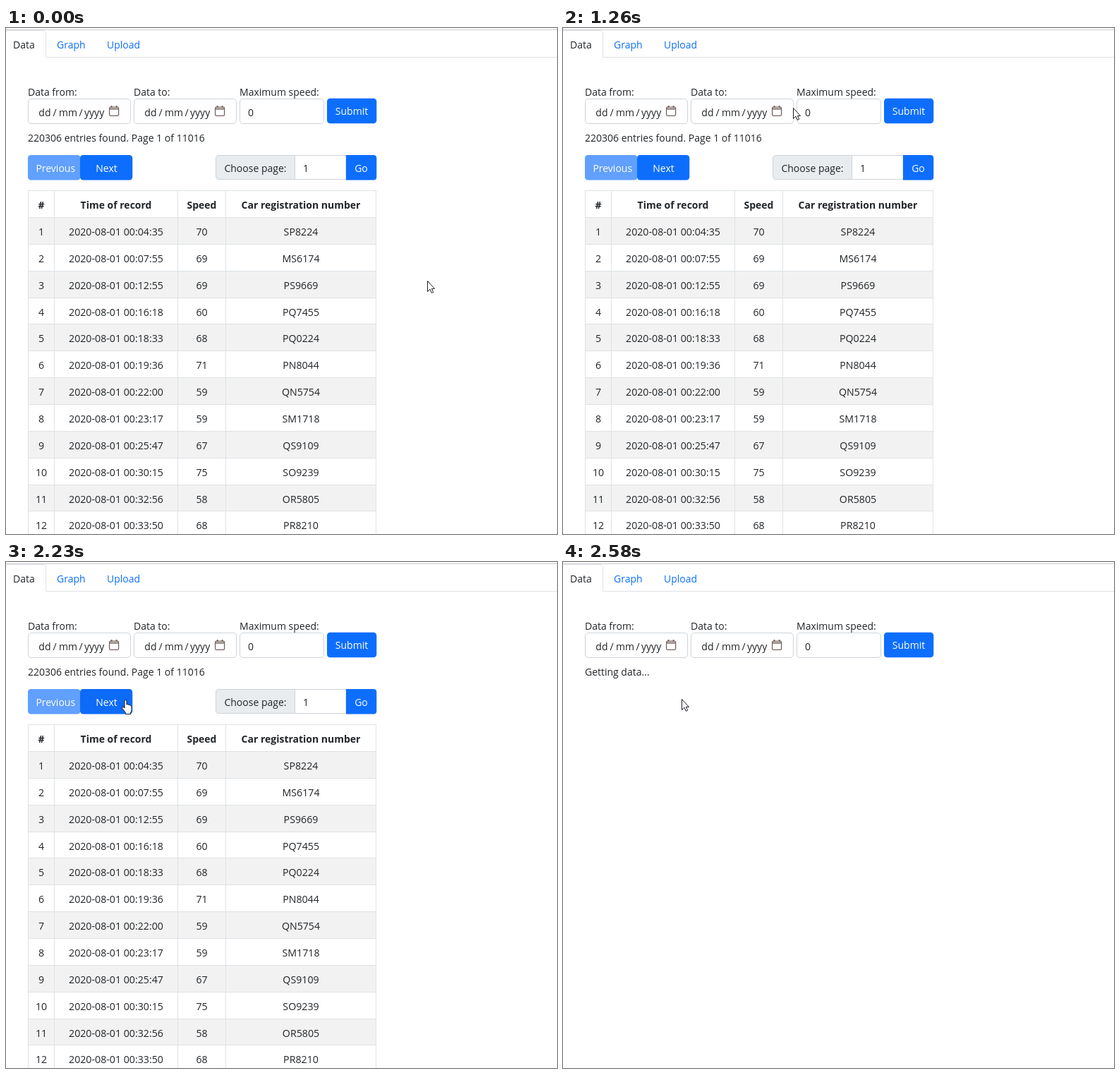
An HTML page for the animation above (8000 ms loop, 781 px wide and 717 px high).

```html
<!DOCTYPE html>
<html lang="en">
<head>
<meta charset="utf-8">
<title>Speed records</title>
<style>
  html, body { margin: 0; width: 100%; height: 100%; overflow: hidden; background: #fff; }
  svg { display: block; }
  text { font: 14px "Open Sans", "Noto Sans", sans-serif; fill: #212529; white-space: pre; }
  .mid { text-anchor: middle; }
  .cell { font-size: 14.2px; }
  .head { font-weight: 700; }
  .link { fill: #0d6efd; }
  .light { fill: #fff; }
  .field { fill: #fff; stroke: #ced4da; }
  .line { fill: none; stroke: #dee2e6; }
  .button { fill: #0d6efd; }
  .icon { fill: none; stroke: #75645f; stroke-width: 1.3; }
  .pointer { fill: #fff; stroke: #1c1c24; stroke-linejoin: round; }
</style>
</head>
<body>
<svg width="781" height="717" viewBox="0 0 781 717">
  <path d="M0 2.5H781" stroke="#cdcdd0"/>
  <path class="line" d="M0 3.5H52Q56.5 3.5 56.5 8V41.5H781"/>
  <text x="10" y="29">Data</text>
  <text class="link" x="72" y="29">Graph</text>
  <text class="link" x="143" y="29">Upload</text>

  <text x="31" y="96">Data from:</text>
  <text x="181" y="96">Data to:</text>
  <text x="331" y="96">Maximum speed:</text>
  <defs>
    <g id="date">
      <rect class="field" x="31.5" y="100.5" width="145" height="35" rx="4.5"/>
      <text y="125"><tspan x="46.3">dd</tspan><tspan x="66.5">/</tspan><tspan x="75">mm</tspan><tspan x="103.5">/</tspan><tspan x="111">yyyy</tspan></text>
      <rect class="icon" x="146.6" y="112.2" width="13" height="12.2" rx="1.6"/>
      <path class="icon" d="M146.6 114.6H159.6M149.6 110V113M156.6 110V113" style="stroke-width:1.8"/>
    </g>
  </defs>
  <use href="#date"/>
  <use href="#date" x="150"/>
  <rect class="field" x="331.5" y="100.5" width="119" height="35" rx="4.5"/>
  <text x="343" y="125">0</text>
  <rect class="button" x="455" y="99.7" width="70.3" height="35.6" rx="4.5"/>
  <text class="mid light" x="490" y="123">Submit</text>
  <text id="status" x="31" y="161"></text>

  <g id="results">
    <rect class="button" x="31" y="179.9" width="74.5" height="35.6" rx="4.5" opacity=".65"/>
    <text class="mid light" x="70.3" y="204">Previous</text>
    <rect class="button" id="next" x="105" y="179.9" width="74.3" height="35.6" rx="4.5"/>
    <text class="mid light" x="142.5" y="204">Next</text>
    <path class="field" d="M409.5 180.5H482V214.5H409.5Z"/>
    <path d="M409.5 180.5H302Q297.5 180.5 297.5 185V210Q297.5 214.5 302 214.5H409.5Z" fill="#e9ecef" stroke="#ced4da"/>
    <text class="mid" x="353.5" y="204">Choose page:</text>
    <text x="421" y="204">1</text>
    <path class="button" d="M482 179.9H520.8Q525.3 179.9 525.3 184.4V211Q525.3 215.5 520.8 215.5H482Z"/>
    <text class="mid light" x="503.5" y="204">Go</text>
    <g id="table"></g>
  </g>

  <g id="cursor">
    <path id="arrow" class="pointer" d="M.5 .5V15.5L4 12.2L6.3 17.4L8.7 16.3L6.4 11.4H10.5Z"/>
    <path id="beam" fill="none" stroke="#222" d="M-3 -7.5H-1L0 -6.5L1 -7.5H3M0 -6.5V6.5M-3 7.5H-1L0 6.5L1 7.5H3"/>
    <path id="hand" class="pointer" d="M-1 12V2Q-1 .5 .5 .5T2 2V7Q4 6 4.8 7.6Q6.5 6.8 7.3 8.5Q9 8 9 10.2V14.5Q9 17 7.5 18.5V20.5H.5V18.5L-4.4 12.2Q-4.6 9.5 -2.3 10.8Z"/>
  </g>
</svg>
<script>
const LOOP = 8000, MOVE_START = 570, STEP = 69, CLEARED = 2580;
const $ = id => document.getElementById(id);

const records = [
  ['04:35', 70, 'SP8224'], ['07:55', 69, 'MS6174'], ['12:55', 69, 'PS9669'],
  ['16:18', 60, 'PQ7455'], ['18:33', 68, 'PQ0224'], ['19:36', 71, 'PN8044'],
  ['22:00', 59, 'QN5754'], ['23:17', 59, 'SM1718'], ['25:47', 67, 'QS9109'],
  ['30:15', 75, 'SO9239'], ['32:56', 58, 'OR5805'], ['33:50', 68, 'PR8210']
];
const centers = [50, 156, 277.5, 418];
const rowTop = i => Math.round(230.2 + i * 37.85);

function rowMarkup(cells, i) {
  const top = rowTop(i);
  const stripe = i % 2 ? `<rect x="31" y="${top}" width="494" height="38" fill="#f2f2f2"/>` : '';
  const texts = cells.map((cell, c) =>
    `<text class="mid ${i ? 'cell' : 'head'}" x="${centers[c]}" y="${top + 25.5}">${cell}</text>`);
  return stripe + texts.join('');
}

const rows = [
  ['#', 'Time of record', 'Speed', 'Car registration number'],
  ...records.map(([time, speed, plate], i) => [i + 1, `2020-08-01 00:${time}`, speed, plate])
];
const rules = rows.map((_, i) => `M31 ${rowTop(i) + 0.5}H525`).join('') +
  [31.5, 68.5, 243.5, 311.5, 524.5].map(x => `M${x} 230V717`).join('');
$('table').innerHTML = rows.map(rowMarkup).join('') + `<path class="line" d="${rules}"/>`;

// Pointer path: step, x, y
const path = [
  [-1, 597, 358], [0, 587, 344], [3, 450, 238], [6, 262, 146], [8, 206, 122],
  [10, 326, 113], [11, 392, 106], [12, 397, 105], [14, 397, 105], [15, 393, 108],
  [16, 381, 115], [18, 345, 131], [20, 301, 144], [22, 228, 176], [24, 169, 195], [25, 168, 194]
];

function pointerAt(t) {
  const step = Math.max(-1, Math.min(25, Math.floor((t - MOVE_START) / STEP)));
  const i = Math.max(1, path.findIndex(p => p[0] >= step));
  const [a, b] = [path[i - 1], path[i]];
  const k = (step - a[0]) / (b[0] - a[0]);
  return [1, 2].map(n => Math.round(a[n] + (b[n] - a[n]) * k));
}

const ramp = (t, from, length) => Math.max(0, Math.min(1, (t - from) / length));
const inside = (x, y, left, top, right, bottom) => x >= left && x <= right && y >= top && y <= bottom;

function buttonColor(t) {
  const hover = ramp(t, 2205, 150), press = ramp(t, 2420, 150);
  const mix = (base, over, down) => base + (over - base) * hover + (down - over) * press;
  return `rgb(${mix(13, 11, 10)},${mix(110, 94, 88)},${mix(253, 215, 202)})`;
}

function draw(now) {
  const t = now % LOOP, loading = t >= CLEARED;
  const [x, y] = pointerAt(t);
  const kind = inside(x, y, 332, 101, 451, 136) ? 'beam'
    : !loading && inside(x, y, 105, 180, 179, 215) ? 'hand' : 'arrow';
  for (const id of ['arrow', 'beam', 'hand']) $(id).style.display = id === kind ? '' : 'none';
  $('cursor').setAttribute('transform', `translate(${x} ${y})`);
  $('results').style.display = loading ? 'none' : '';
  $('status').textContent = loading ? 'Getting data...' : '220306 entries found. Page 1 of 11016';
  $('next').style.fill = buttonColor(t);
}

let start;
function tick(now) {
  start ??= now;
  draw(now - start);
  requestAnimationFrame(tick);
}
draw(0);
requestAnimationFrame(tick);
</script>
</body>
</html>
```
